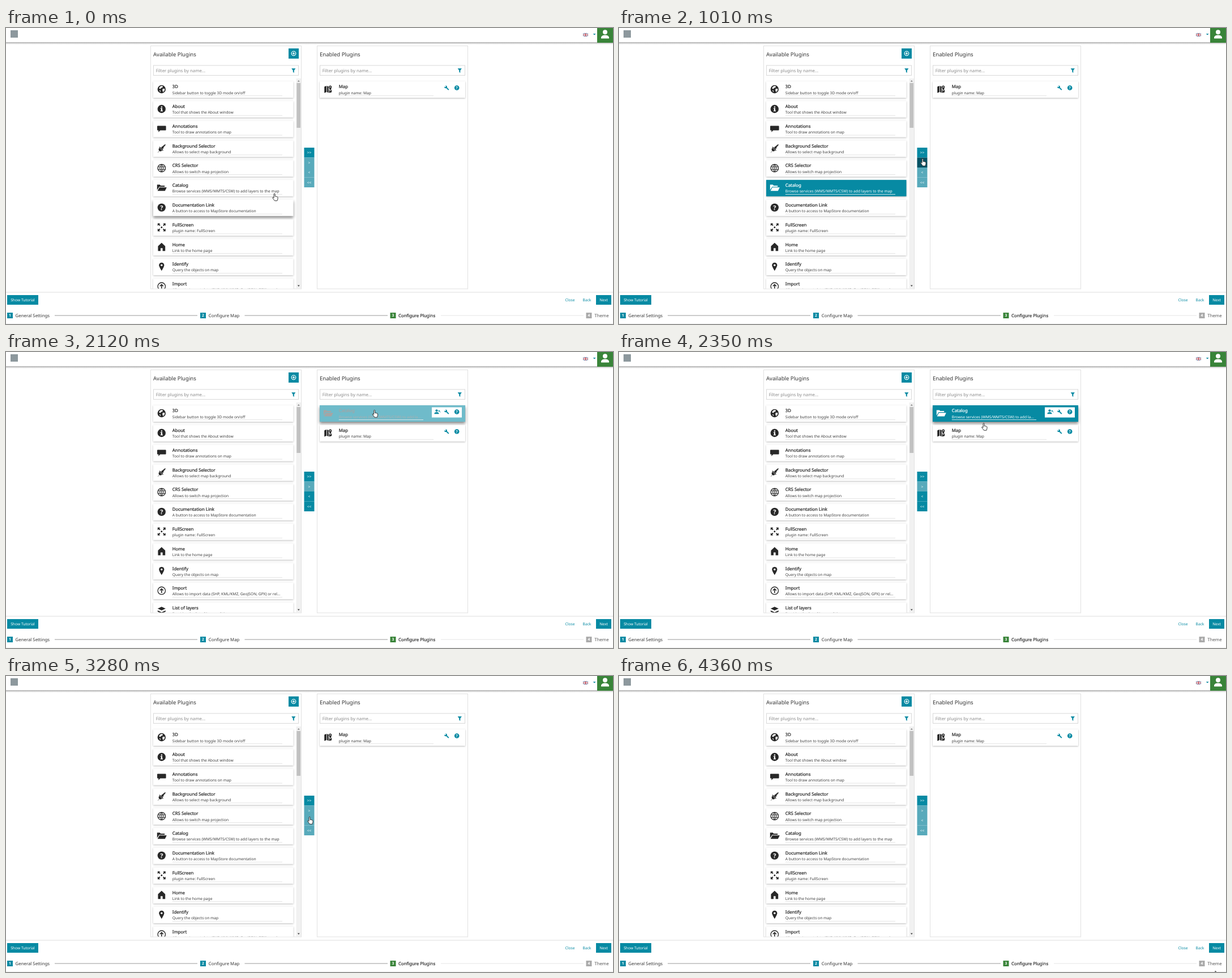
An HTML page for the animation above (4440 ms loop, 1072 by 522 pixels).

```html
<!DOCTYPE html>
<html lang="en">
<head>
<meta charset="utf-8">
<title>Configure Plugins</title>
<style>
html, body { margin: 0; width: 100%; height: 100%; overflow: hidden; background: #fff; }
svg { display: block; width: 1072px; height: 522px; }
text { font-family: "Noto Sans", "Open Sans", sans-serif; text-rendering: geometricPrecision; white-space: pre; }
.card { filter: drop-shadow(0 1.8px 1.6px rgba(0,0,0,.27)); }
.hover { filter: drop-shadow(0 3.8px 2.6px rgba(0,0,0,.48)); }
</style>
</head>
<body>
<svg viewBox="0 0 1072 522">
  <defs>
    <clipPath id="list"><rect x="256" y="88" width="560" height="371.5"/></clipPath>
    <linearGradient id="fade" x2="0" y2="1">
      <stop offset="0" stop-color="#aaa"/><stop offset="1" stop-color="#fff"/>
    </linearGradient>
  </defs>
  <g id="base"></g>
  <g id="live"></g>
</svg>
<script>
const LOOP = 4440, TEAL = '#078aa3', DIM = '#58aabb', GREEN = '#398439', INK = '#333';

const rect = (x, y, w, h, fill, more = '') => `<rect x="${x}" y="${y}" width="${w}" height="${h}" fill="${fill}" ${more}/>`;
const box = (x, y, w, h, line) => rect(x, y, w, h, '#fff', `stroke="${line}"`);
const dot = (x, y, r, fill, more = '') => `<circle cx="${x}" cy="${y}" r="${r}" fill="${fill}" ${more}/>`;
const path = (d, fill, more = '') => `<path d="${d}" fill="${fill}" ${more}/>`;
const line = (d, color, w = 1) => path(d, 'none', `stroke="${color}" stroke-width="${w}"`);
const text = (x, y, s, size, fill, more = '') => `<text x="${x}" y="${y}" font-size="${size}" fill="${fill}" ${more}>${s}</text>`;
const mid = 'text-anchor="middle"';
const heavy = c => `stroke="${c}" stroke-width=".22"`;
const at = (x, y, s) => `<g transform="translate(${x} ${y})">${s}</g>`;
const mix = (a, b, p) => `rgb(${a.map((v, i) => Math.round(v + (b[i] - v) * p))})`;

// Icons are centred on 0,0; c is the ink, b the cut-out colour.
const glyph = (s, size, b) => text(0, size * .36, s, size, b, `${mid} font-weight="700"`);
const icons = {
  globe: (c, b) => dot(0, 0, 7.2, c) + path('M-1-5.8l3.2.4-.6 2.4-2.2.6-1.6 2-2.4-1.2q.6-3 3.6-4.2zM2-1l3.6.2-.4 3-2.4 2.8-1.4-3zM-4.2 1.8l2.4.6-.2 2.8z', b),
  info: (c, b) => dot(0, 0, 7.2, c) + rect(-1, -4.5, 2.2, 2, b) + path('M-2-1.5h3.2v4.5h1v1.3h-4.2v-1.3h1v-3.2h-1z', b),
  comment: c => path('M-6.8-5H6.8q1 0 1 1v6q0 1-1 1H-2.5l-3 3.2V3h-1.3q-1 0-1-1v-6q0-1 1-1z', c),
  plug: c => path('M-7 7.4l2.6-3.2q-2-3 .6-5.2l4.8 4.8q-2.2 2.6-5 .6l-2.4 3zM-1-1.2l2.2-2.6 2.8 2.8-2.4 2.4zM1.6-3.6l2-1.8 2.6-2 1 1-2 2.6-1.8 2z', c) + line('M-3.8-2.6L2.6 3.8', c, 1.4),
  grid: c => dot(0, 0, 6.8, 'none', `stroke="${c}" stroke-width="1.3"`) + line('M-6.8-2.2H6.8M-6.8 2.2H6.8M0-6.8V6.8M0-6.8Q-6.5 0 0 6.8Q6.5 0 0-6.8', c),
  folder: c => path('M-8-5.5h5l1.4 1.6h7v2h-9.6L-8 4zM-3.8-.8H9L6 5.4H-7.2z', c),
  help: (c, b) => dot(0, 0, 7.2, c) + glyph('?', 11, b),
  full: c => [0, 90, 180, 270].map(a => path('M-7-7h4.6L-3.9-5.5l1.8 1.8-1.4 1.4-1.8-1.8L-7-2.4z', c, `transform="rotate(${a})"`)).join('') + dot(0, 0, 1.5, c),
  home: c => path('M0-7.4l6.4 6V7H1.8V2.2h-3.6V7h-4.6v-8.4z', c),
  pin: (c, b) => path('M0 7.2Q-4.6 0-4.6-2.6A4.6 4.6 0 0 1 4.6-2.6Q4.6 0 0 7.2z', c) + dot(0, -2.7, 1.7, b),
  upload: c => dot(0, 0, 6.7, 'none', `stroke="${c}" stroke-width="1.3"`) + line('M0 4V-3M-3-.4L0-3.4 3-.4', c, 1.6),
  layers: c => path('M0-6.5l7 3.3-7 3.3-7-3.3zM-7 0l7 3.3 7-3.3v2.2L0 5.5-7 2.2z', c),
  map: (c, b) => path('M-6.6-4.6l3.8-1.4V5L-6.6 6.4zM-1.9-6L.9-4.8v11L-1.9 5zM1.8.4l2 3.2 2.6-3.4v5L1.8 6.4z', c) + path('M3.9 2.4Q1.4-2 1.4-4a2.5 2.5 0 0 1 5 0Q6.4-2 3.9 2.4z', c) + dot(3.9, -4, .9, b)
};

const wrench = c => line('M-1.3-1.3L3.6 3.6', c, 1.9) + line('M-3.2-.6A1.9 1.9 0 0 0-.6-3.2', c, 1.6) + path('M-4.3-2.4l1.6 1.4 1.6-1.6-1.4-1.6 2.4.6 1 2.6-2 2-2.6-1z', c);
const person = c => dot(0, -2.2, 2.1, c) + path('M-4 3.8V2.6Q-3.4.6 0 .6T4 2.6v1.2z', c);
const query = c => dot(0, 0, 4.3, c) + glyph('?', 6.8, '#fff');
const funnel = path('M-3.6-3.8h7.2L1 0v4L-1 2.7V0z', TEAL);

const catalog = ['Catalog', 'Browse services (WMS/WMTS/CSW) to add layers to the map', 'folder'];
const map = ['Map', 'plugin name: Map', 'map'];
const plugins = [
  ['3D', 'Sidebar button to toggle 3D mode on/off', 'globe'],
  ['About', 'Tool that shows the About window', 'info'],
  ['Annotations', 'Tool to draw annotations on map', 'comment'],
  ['Background Selector', 'Allows to select map background', 'plug'],
  ['CRS Selector', 'Allows to switch map projection', 'grid'],
  catalog,
  ['Documentation Link', 'A button to access to MapStore documentation', 'help'],
  ['FullScreen', 'plugin name: FullScreen', 'full'],
  ['Home', 'Link to the home page', 'home'],
  ['Identify', 'Query the objects on map', 'pin'],
  ['Import', 'Allows to import data (SHP, KML/KMZ, GeoJSON, GPX) or rel...', 'upload'],
  ['List of layers', 'Provides the list of layers of the map', 'layers']
];

function card([name, info, icon], i, right, hover, sel) {
  const x = right ? 554 : 260, y = 94 + i * 34.77, w = right ? 257 : 247.5;
  const own = right && name === 'Catalog';
  const ink = mix([40, 40, 40], [255, 255, 255], sel), bg = mix([255, 255, 255], [7, 138, 163], sel);
  const end = own ? 183 : right ? 201 : 228;
  if (own) info = 'Browse services (WMS/WMTS/CSW) to add la...';
  let s = rect(0, 0, w, 29, bg, `class="${hover ? 'hover' : 'card'}"`)
    + at(14.8, 14, icons[icon](ink, bg))
    + line(`M33.8 25.5H${end}`, mix([222, 222, 222], [255, 255, 255], sel), .8)
    + text(33.8, 12.4, name, 7.8, ink, heavy(ink))
    + text(33.8, 22.5, info, 6.7, mix([62, 62, 62], [255, 255, 255], sel));
  if (right) {
    if (sel) s += rect(198, 3.5, 53, 18, '#fff');
    if (own) s += at(206.5, 11.5, person(TEAL)) + at(211.5, 10.5, `<g transform="scale(.5)">${wrench(TEAL)}</g>`);
    s += at(224.2, 11.5, wrench(TEAL)) + at(242.2, 11.5, query(TEAL));
  }
  return at(x, y, s);
}

const cursors = {
  hand: 'M3.1 8.2V1.5a1 1 0 0 1 2.1 0V5.4l1.7.2 1.7.4q1.6.4 1.5 2l-.3 2.6-.9 2.6H4.5L2.3 10.2.6 7.9q.4-1.4 1.6-.6z',
  arrow: 'M0 0V9.8l2.3-2 1.6 3.3 1.5-.7-1.5-3.2H7z'
};

function panel(x, title, r) {
  return box(x - 4.5, 31.5, 266, 428.5, '#e1e1e1')
    + text(x, 50.3, title, 9.57, INK)
    + box(x + .5, 66, 256, 17.5, '#d8d8d8')
    + text(x + 4.8, 77.8, 'Filter plugins by name...', 7.8, '#8a8a8a')
    + at(r, 75, funnel);
}

function step(x, n, label, color, tx, bold) {
  return rect(x, 502, 10, 10, color) + text(x + 5, 509.4, n, 6.7, '#fff', `${mid} font-weight="700"`)
    + text(tx, 509.6, label, 7.8, n > 3 ? '#555' : INK, bold ? heavy(INK) : '');
}

base.innerHTML =
  rect(0, 25, 1072, 4, 'url(#fade)')
  + rect(8, 4, 13, 13, '#8d989d')
  + rect(1019, 9, 9, 6, '#34467c') + line('M1019 9l9 6M1028 9l-9 6', '#fff', 1.2)
  + line('M1023.5 9v6M1019 12h9', '#fff', 2) + line('M1023.5 9v6M1019 12h9', '#c8454f', 1)
  + path('M1036.8 10h4.8l-2.4 2.6z', TEAL)
  + rect(1044, 0, 28, 26, GREEN)
  + dot(1058, 7.2, 4, '#fff') + path('M1051 18.5v-2.2q1-3.8 7-3.8t7 3.8v2.2z', '#fff')
  + panel(260, 'Available Plugins', 507.8) + panel(554, 'Enabled Plugins', 801.3)
  + rect(499, 36, 18, 18, TEAL)
  + dot(508, 44.8, 3.8, 'none', 'stroke="#fff" stroke-width="1.2"') + line('M505.8 44.8h4.4M508 42.6v4.4', '#fff', 1.2)
  + rect(512.5, 89, 8.5, 370, '#f1f1f1')
  + path('M514.8 94.6l2-2.4 2 2.4z', '#777') + path('M514.8 453.6l2 2.4 2-2.4z', '#444')
  + line('M0 466H1072', '#ddd') + line('M0 521.5H1072', '#f0f0f0')
  + rect(2, 471, 55, 17, TEAL) + text(29.5, 481.9, 'Show Tutorial', 6.7, '#fff', mid)
  + text(996, 481.9, 'Close', 6.7, TEAL, mid) + text(1026, 481.9, 'Back', 6.7, TEAL, mid)
  + rect(1042, 471, 27, 17, TEAL) + text(1055.5, 481.9, 'Next', 6.7, '#fff', mid)
  + step(2, 1, 'General Settings', TEAL, 16.6) + line('M86 507H338', '#999')
  + step(343, 2, 'Configure Map', TEAL, 357.8) + line('M421.5 507H674', '#999')
  + step(678.5, 3, 'Configure Plugins', GREEN, 693, true) + line('M768 507H1020', '#e4e4e4')
  + step(1024.5, 4, 'Theme', '#aaa', 1039.3);

// Each entry: time, cursor x, y, and the changes to the rest of the state.
const hand = { kind: 'hand' }, arrow = { kind: 'arrow' };
const steps = [
  [0, 470, 291.5, { ...hand, moved: false, sel: 0, left: 'Documentation Link', right: '', hot: -1, press: 0 }],
  [90, 470, 290, { left: 'Catalog' }],
  [160, 471, 288],
  [240, 473, 285],
  [310, 476, 282],
  [380, 483, 276, { sel: .08 }],
  [460, 496, 267, { sel: .4 }],
  [530, 513, 255.5, { ...arrow, sel: .74 }],
  [630, 523, 246, { left: '', sel: .96 }],
  [700, 531, 234, { ...hand, hot: 1, sel: 1 }],
  [780, 532, 230],
  [1010, 532, 230, { press: 1 }],
  [1160, 532, 230, { moved: true, sel: 0, hot: -1, press: 0 }],
  [1340, 549, 218, arrow],
  [1420, 582, 190],
  [1500, 624, 150, { ...hand, right: 'Map' }],
  [1580, 646, 121],
  [1650, 646, 108, { right: '' }],
  [1730, 646.5, 102],
  [1890, 646.5, 102, { right: 'Catalog' }],
  [1970, 646.5, 102, { sel: .03 }],
  [2050, 646.5, 102, { sel: .22 }],
  [2120, 646.5, 102, { sel: .58 }],
  [2200, 646.5, 102, { sel: .88 }],
  [2270, 645, 108, { sel: .98 }],
  [2350, 640, 125, { sel: 1 }],
  [2430, 628, 146, { right: 'Map' }],
  [2510, 606, 180, { ...arrow, right: '' }],
  [2590, 584, 209],
  [2660, 564, 230],
  [2740, 549, 242],
  [2820, 536, 246, { ...hand, hot: 2 }],
  [2900, 534, 247],
  [2980, 533, 248],
  [3050, 532, 248],
  [3130, 532, 248, { press: 1 }],
  [3280, 532, 248, { moved: false, sel: 0, hot: -1, press: 0 }],
  [3820, 818, 332.5, arrow],
  [3900, 930, 390],
  [3970, 1036, 446],
  [4050, 1090, 480],
  [4220, 1062, 506.5],
  [4290, 1057, 514],
  [4360, 1053, 520]
];
let last = {};
const states = steps.map(([t, x, y, change]) => last = { ...last, ...change, t, x, y });

function draw(s) {
  const avail = s.moved ? plugins.filter(p => p !== catalog) : plugins.slice(0, 11);
  const enabled = s.moved ? [catalog, map] : [map];
  const cards = (list, right) => list.map((p, i) => card(p, i, right,
    (right ? s.right : s.left) === p[0], p === catalog ? s.sel : 0)).join('');
  const on = [true, !s.moved && s.sel > 0, s.moved && s.sel > 0, s.moved];
  const buttons = ['&gt;&gt;', '&gt;', '&lt;', '&lt;&lt;'].map((label, i) => {
    const fill = s.hot === i ? (s.press ? '#045163' : '#056173') : on[i] ? TEAL : DIM;
    const y = 211 + i * 17.5;
    return rect(526.5, y, 18, 17.5, fill) + text(535.5, y + 11.2, label, 6.7, '#fff', mid);
  }).join('');
  return rect(513.3, 97, 6.8, s.moved ? 81 : 79, '#c1c1c1')
    + `<g clip-path="url(#list)">${cards(avail, false)}${cards(enabled, true)}</g>`
    + buttons
    + at(s.x, s.y, path(cursors[s.kind], '#fff', 'stroke="#222" stroke-width=".9" stroke-linejoin="round"'));
}

const start = performance.now();
let shown;
function tick() {
  const t = (performance.now() - start) % LOOP;
  const now = states.findLast(s => s.t <= t) || states[0];
  if (now !== shown) live.innerHTML = draw(shown = now);
  requestAnimationFrame(tick);
}
tick();
</script>
</body>
</html>
```
